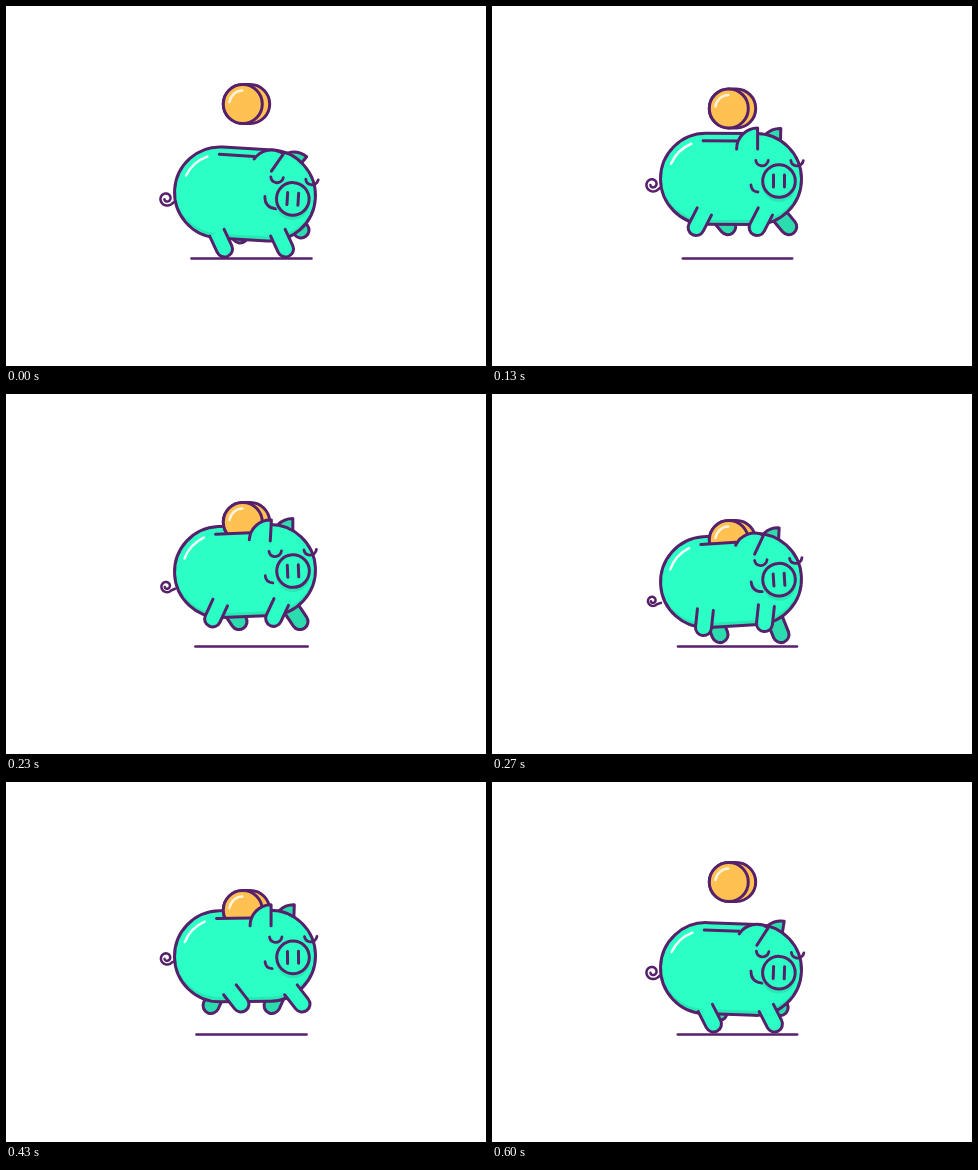
An HTML page with a canvas for the animation above (0.63 s loop, 480 by 360 pixels).

```html
<!DOCTYPE html>
<html lang="en">
<head>
<meta charset="utf-8">
<title>Piggy bank</title>
<style>
html, body { margin: 0; width: 100%; height: 100%; overflow: hidden; background: #fff; }
canvas { display: block; }
</style>
</head>
<body>
<canvas id="stage" width="480" height="360"></canvas>
<script>
const ctx = document.getElementById('stage').getContext('2d');
const LOOP = 630, HALF = LOOP / 2, RAD = Math.PI / 180;
const INK = '#57206b', SKIN = '#2bffc6', SHADE = '#26e9b6', FAR = '#2adcae', GOLD = '#ffc152';

// The picture advances in these steps (ms).
const STEPS = [0, 30, 70, 130, 170, 200, 230, 270, 330, 370, 400, 430, 470, 530, 570, 600];

// Keys are [time, ...values]; returns a smooth periodic curve without overshoot.
function curve(period, keys) {
  const n = keys.length;
  const at = i => {
    const turn = Math.floor(i / n), k = keys[i - turn * n];
    return [k[0] + turn * period, ...k.slice(1)];
  };
  const rate = (a, b, c) => (b[c] - a[c]) / (b[0] - a[0]);
  const tangent = (i, c) => {
    const l = rate(at(i - 1), at(i), c), r = rate(at(i), at(i + 1), c);
    return l * r <= 0 ? 0 : 2 * l * r / (l + r);
  };
  return time => {
    const t = time % period;
    let i = n - 1;
    while (keys[i][0] > t) i--;
    const a = at(i), b = at(i + 1), d = b[0] - a[0], u = (t - a[0]) / d;
    return a.slice(1).map((v, j) => {
      const c = j + 1, s = u * u * (3 - 2 * u);
      return v + (b[c] - v) * s +
        d * (tangent(i, c) * u * (1 - u) * (1 - u) - tangent(i + 1, c) * u * u * (1 - u));
    });
  };
}

// Body height, front ear angle, back ear angle: two bounces per loop.
const bounce = curve(HALF, [
  [0, 188, 35, 39], [70, 178.5, 6, 23], [115, 174, 0, 2], [170, 171, 0, 2],
  [215, 174, 0, 0], [270, 186.6, 25, 3], [285, 187, 33, 9]
]);
const tiltAt = curve(LOOP, [[0, 3.5], [70, 0.5], [170, 0], [270, -3.5], [315, -3.6], [430, -0.8], [530, 0], [600, 2]]);
const coinAt = curve(LOOP, [[0, 98], [70, 99.5], [170, 106], [270, 146], [322, 162], [370, 152], [430, 128], [530, 107.5], [600, 100]]);
// Tail height below the body centre, and its size.
const tailAt = curve(LOOP, [[0, 4.5, 1], [70, 5, 1], [170, 6, 1], [270, 20, 0.75], [330, 13, 0.8], [430, 2, 0.92], [530, 0, 0.95], [600, 3, 1]]);
// Foot x, foot y, leg angle, extra lift of the front leg.
const legAt = curve(LOOP, [
  [0, -20.5, 55, 25, 0], [70, -31.5, 52.5, -10, 0], [115, -34, 49.5, -24, 0],
  [170, -36.5, 47, -32, 0], [215, -33.5, 48, -28, 0], [270, -27.5, 47, -6, 4],
  [288, -10, 43, 30, 5], [315, -5, 41, 38, 5], [385, -2, 44.5, 45, 1],
  [430, -4, 48, 38, 0], [485, 0, 47, 48, 0], [530, -4.5, 49.5, 39, 0],
  [585, -11, 54, 22, 0], [600, -17.5, 55, 27, 0]
]);

function paint(fill, stroke = INK, width = 3) {
  if (fill) { ctx.fillStyle = fill; ctx.fill(); }
  if (stroke) { ctx.strokeStyle = stroke; ctx.lineWidth = width; ctx.stroke(); }
}

function line(x1, y1, x2, y2, width = 3) {
  ctx.beginPath();
  ctx.moveTo(x1, y1);
  ctx.lineTo(x2, y2);
  paint(null, INK, width);
}

function arc(x, y, r, from = 0, to = 360) {
  ctx.beginPath();
  ctx.arc(x, y, r, from * RAD, to * RAD);
}

// Horizontal capsule whose round ends are centred on x1 and x2.
function capsule(x1, x2, y, r) {
  ctx.beginPath();
  ctx.arc(x1, y, r, 90 * RAD, 270 * RAD);
  ctx.arc(x2, y, r, -90 * RAD, 90 * RAD);
  ctx.closePath();
}

function placed(x, y, degrees, draw) {
  ctx.save();
  ctx.translate(x, y);
  ctx.rotate(degrees * RAD);
  draw();
  ctx.restore();
}

function leg(x, y, degrees, fill) {
  placed(x, y, -degrees, () => {
    ctx.beginPath();
    ctx.moveTo(8, -18);
    ctx.arc(0, 0, 8, 0, Math.PI);
    ctx.lineTo(-8, -18);
    paint(fill);
  });
}

function legPair(time, cy, fill) {
  const [x, y, angle, lift] = legAt(time);
  leg(239 + x, cy + y, angle, fill);
  leg(300 + x, cy + y - lift, angle, fill);
}

function ear(x, degrees, fill) {
  placed(x, -30, degrees, () => {
    ctx.beginPath();
    ctx.arc(10.5, 0, 21, 180 * RAD, 270 * RAD);
    ctx.lineTo(10.5, 0);
    paint(fill);
  });
}

function tail(x, y, size) {
  ctx.beginPath();
  ctx.moveTo(169, y + 3 * size);
  for (let a = 40; a <= 520; a += 10) {
    const r = size * (7.6 - 5.4 * (a - 40) / 480);
    ctx.lineTo(x + r * Math.cos(a * RAD), y + r * Math.sin(a * RAD));
  }
  paint(null, INK, 2.5);
}

function body() {
  capsule(-25, 25, 0, 46);
  paint(SHADE, null);
  ctx.save();
  ctx.clip();
  capsule(-25, 25, -5, 46);
  paint(SKIN, null);
  ctx.restore();
  capsule(-25, 25, 0, 45.5);
  paint(null);
  arc(-25, 0, 38, 203, 247);
  paint(null, '#f4fffb', 2.5);
}

function coin(y) {
  capsule(236.8, 244.2, y, 19.5);
  paint(GOLD);
  arc(236.8, y, 19.5);
  paint(GOLD);
  arc(236.8, y, 13.5, 188, 268);
  paint(null, '#fff3dc', 2.5);
}

function face(smile) {
  for (const x of [31, 66]) {
    arc(x, -19.5, 6.3, 8, 172);
    paint(null, INK, 2.8);
  }
  ctx.beginPath();
  ctx.moveTo(20, 13 - smile);
  ctx.quadraticCurveTo(20.3, 12.5, 20 + smile, 13);
  paint(null, INK, 2.8);
  arc(48, 6, 17);
  paint(SHADE, null);
  arc(48, 2, 16.3);
  paint(SKIN);
  line(42.5, -4, 42.5, 8);
  line(53.5, -4, 53.5, 8);
}

function draw(time) {
  const [cy, frontEar, backEar] = bounce(time);
  const [tilt] = tiltAt(time);
  const [tailY, tailSize] = tailAt(time);
  const onBody = part => placed(239, cy, tilt, part);

  ctx.fillStyle = '#fff';
  ctx.fillRect(0, 0, 480, 360);
  ctx.lineCap = ctx.lineJoin = 'round';

  const half = 54 + 6 * (cy - 171) / 17;
  line(245.5 - half, 252.5, 245.5 + half, 252.5, 2.6);

  tail(160.5, cy + tailY, tailSize);
  legPair(time + HALF, cy, FAR);
  onBody(() => {
    ear(38.5, backEar - tilt, FAR);
    body();
  });

  // The coin shows only above the slot.
  ctx.save();
  onBody(() => {
    ctx.beginPath();
    ctx.rect(-200, -300, 400, 262);
  });
  ctx.clip();
  coin(coinAt(time)[0]);
  ctx.restore();

  onBody(() => {
    line(-28, -38, 7, -38);
    ear(16, frontEar - tilt, SKIN);
    face(7 + frontEar * 0.14);
  });
  legPair(time, cy, SKIN);
}

function tick() {
  const now = performance.now() % LOOP;
  draw(STEPS.filter(s => s <= now).pop());
  requestAnimationFrame(tick);
}
tick();
</script>
</body>
</html>
```
